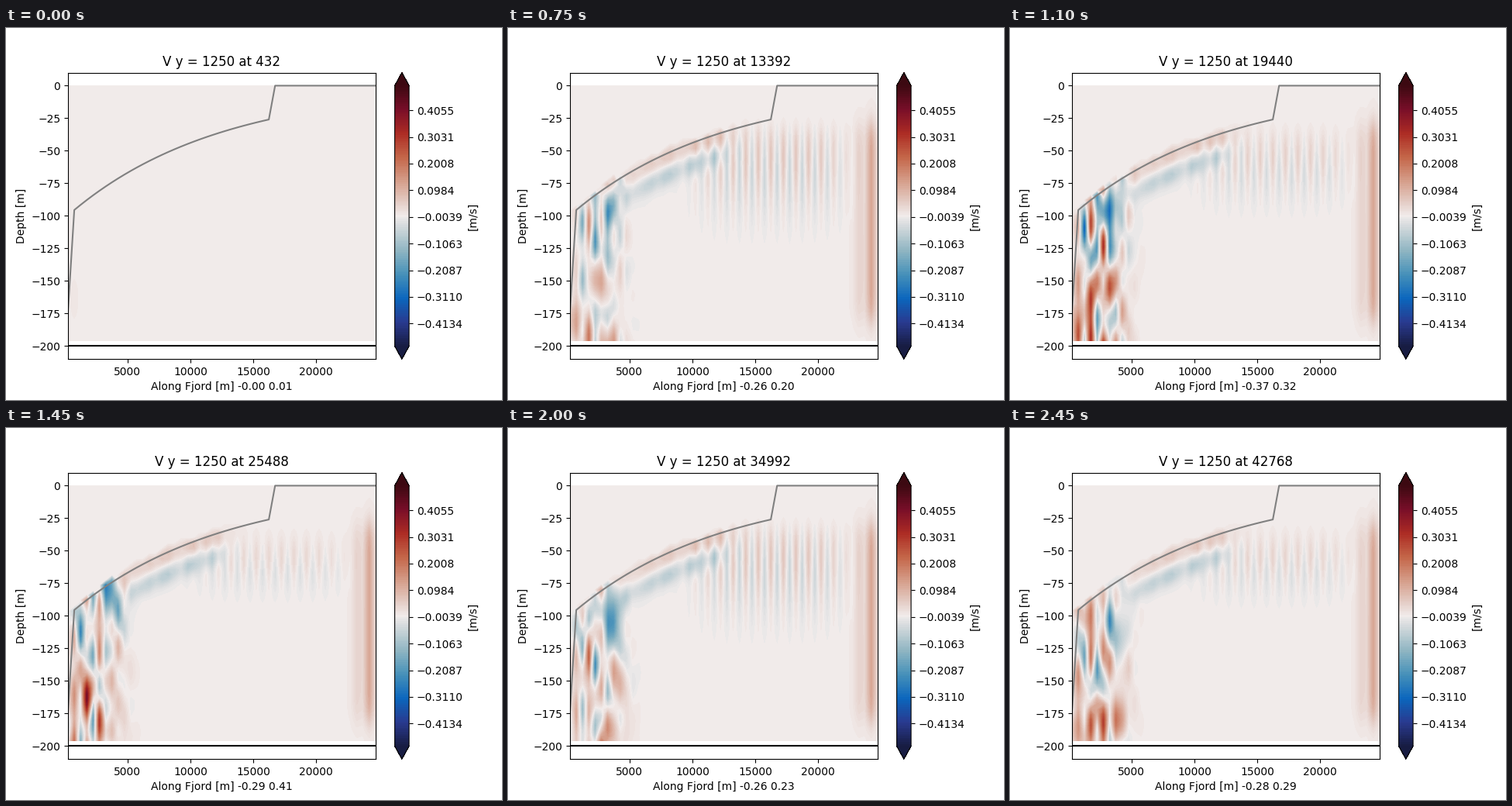
A matplotlib script that plays this animation: 640 px wide and 480 px high, repeating every 2.5 s.

```python
import numpy as np
import matplotlib.pyplot as plt
from matplotlib.animation import FuncAnimation
from matplotlib.colors import LinearSegmentedColormap

FRAMES, INTERVAL = 50, 50

# diverging colours: navy, blue, pale grey, salmon, dark red
cold_side = ["#171c42", "#293a8f", "#0b66bd", "#4590b9", "#8eb5c2", "#d2d8db"]
warm_side = ["#e6d2cc", "#d59d89", "#c46548", "#ac2b24", "#780e28", "#3c0911"]
stops = np.insert(np.linspace(0, 1, 12), 6, 0.5)
cmap = LinearSegmentedColormap.from_list(
    "fjord", list(zip(stops, cold_side + ["#f1eceb"] + warm_side)))
levels = np.linspace(-0.5, 0.5, 128)

# model grid: 500 m columns, 4 m layers
x = 250 + 500 * np.arange(50)
z = -4.0 * np.arange(50)
K, Z = np.meshgrid(np.arange(50), z)
floor = -95.5 * np.exp(-(x - 750) / 11914)
floor[0] = -173
floor[x > 16500] = 0
below = floor - Z
sea = below > -3
sign = np.where(K % 2, 1, -1)

# extreme speeds in m/s at a few key times
key_times = [0, 8, 15, 22, 29, 40, 49]
key_low = [-.001, -.30, -.26, -.37, -.29, -.26, -.28]
key_high = [.01, .20, .20, .32, .41, .23, .29]

# vertical waves of every column: length in m, drift in cycles per step
rng = np.random.default_rng(7)
lengths = [45, 70, 110]
phases = rng.random((len(lengths), 50))
drifts = rng.uniform(-0.05, 0.05, (len(lengths), 50))
patches = rng.uniform(0.5, 1.2, 50)


def bump(v, centre, width):
    return np.exp(-((v - centre) / width) ** 2)


def window(v, lo, hi, soft):
    return 1 / (1 + np.exp((lo - v) / soft)) / (1 + np.exp((v - hi) / soft))


def ramp(t, start, end):
    s = np.clip((t - start) / (end - start), 0, 1)
    return s * s * (3 - 2 * s)


def extremes(t):
    return np.interp(t, key_times, key_low), np.interp(t, key_times, key_high)


def eddies(t):
    """Column-wise eddies at the deep end, scaled to the known extremes."""
    v = 0.08 * sign * window(K, 0, 6, 0.6)
    for length, phase, drift in zip(lengths, phases, drifts):
        v = v + 0.07 * np.sin(2 * np.pi * (Z / length + phase + drift * t))
    v += 0.06 * window(Z, -230, -155, 8)
    v -= 0.18 * bump(K, 6.5, 2) * bump(Z, -99, 16)
    reach = 1 + 7 * ramp(t, 0, 8)
    v = np.where(sea, v * window(K, 0.4, reach, 0.9), 0)
    low, high = extremes(t)
    return np.where(v > 0, v * high / v.max(), v * low / v.min())


def slope_currents(t):
    pair = 0.06 * bump(below, 3, 7) - 0.075 * bump(below, 17, 8)
    return ramp(t, 3, 9) * pair * patches * window(K, 9, 25, 1.2)


def front(t):
    """First pulse, running offshore until it meets the open wall."""
    head = 4.5 * t - 4
    warm = 0.045 * bump(K, head + (Z + 60) / 35, 1.7) * window(Z, -200, -30, 6)
    cold = 0.035 * bump(K, head - 3 - ((Z + 50) / 36) ** 2, 1.8)
    fade = ramp(t, 2, 8) * (1 - ramp(t, 10, 13))
    return fade * (warm - cold * window(Z, -150, -50, 8))


def stripes(t):
    pulse = np.cos(2 * np.pi * (t - 15) / 25)
    centre = np.where(sign > 0, -66, -55)
    shape = bump(Z, centre, 25 + 9 * pulse) * window(Z, -200, -32, 4)
    strength = (0.05 + 0.015 * pulse) * ramp(t, 9, 13)
    return -sign * strength * shape * window(K, 21, 43, 1.5)


def wall(t):
    sheet = 0.12 * bump(K, 48, 0.8) + 0.04 * bump(K, 46, 0.8)
    return ramp(t, 10, 14) * sheet * window(Z, -180, -30, 6)


def speed(t):
    v = eddies(t) + slope_currents(t) + front(t) + stripes(t) + wall(t)
    return np.where(sea, v, 0)


fig, ax = plt.subplots(figsize=(6.4, 4.8), dpi=100)


def paint(v):
    return ax.contourf(x, z, v, levels=levels, cmap=cmap, extend="both")


bar = fig.colorbar(paint(np.zeros_like(Z)), ax=ax)
bar.set_label("[m/s]")
ax.plot(x, floor, color="gray")
ax.axhline(-200, color="black")
ax.set_ylabel("Depth [m]")


def update(t):
    for old in list(ax.collections):
        old.remove()
    paint(speed(t))
    ax.set_xlim(250, 24750)
    ax.set_ylim(-210, 10)
    low, high = extremes(t)
    ax.set_title(f"V y = 1250 at {432 + 864 * t}")
    ax.set_xlabel(f"Along Fjord [m] {low:.2f} {high:.2f}")
    return []


anim = FuncAnimation(fig, update, frames=FRAMES, interval=INTERVAL,
                     repeat=True, repeat_delay=0, blit=False)
plt.show()
```
